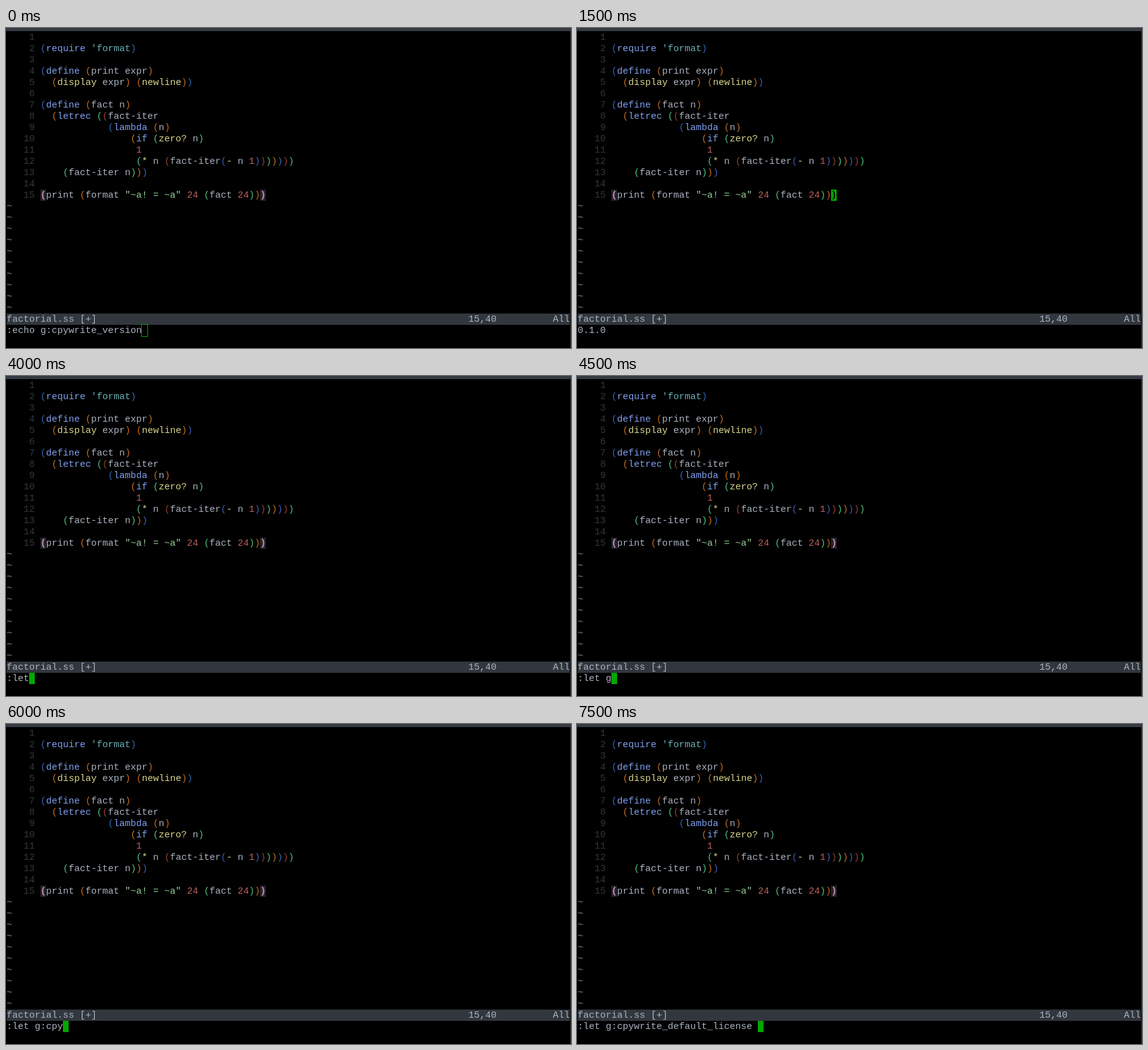
Write an HTML page that moves like this. It is 903 px wide and 511 px high and loops after 8 s.

```html
<!DOCTYPE html>
<html lang="en">
<head>
<meta charset="utf-8">
<title>Editor session</title>
<style>
  :root {
    --fg: #aab3c1;
    --bar: #32373e;
    --green: #00a800;
    --loop: 8s step-end infinite;
  }
  html, body {
    margin: 0;
    width: 100%;
    height: 100%;
    overflow: hidden;
    background: #000;
  }
  /* Rows are 18px high; the taller line box sets the baseline 14px down. */
  #stage {
    position: relative;
    width: 903px;
    height: 511px;
    overflow: hidden;
    color: var(--fg);
    font: 15px/20px "Liberation Mono", monospace;
    white-space: pre;
  }
  #stage > div { position: absolute; }

  #title { left: 0; top: 0; width: 903px; height: 5px; background: #353a43; }
  #edge { left: 902px; top: 0; width: 1px; height: 511px; background: #353a43; }
  #code { left: 1px; top: 6px; }
  #code div, #menu div { height: 18px; }
  #status { left: 1px; top: 456px; width: 900px; height: 18px; background: var(--bar); }
  #status span { position: absolute; top: 0; }

  .nr { color: #31363d; }
  .tilde { color: #5a5f69; font-weight: bold; }
  .key { color: #829fee; }
  .fun { color: #d9d68c; }
  .num { color: #b9605a; }
  .str { color: #97cc97; }
  .sym { color: #68b0b4; }
  .p0 { color: #3560b4; }
  .p1 { color: #c4691a; }
  .p2 { color: #4cbc7c; }
  .p3 { color: #973f2e; }
  .match {
    display: inline-block;
    height: 18px;
    vertical-align: top;
    color: #d08cb4;
    background: #23262b;
    font-weight: bold;
  }

  .cmd { left: 1px; top: 474px; height: 18px; overflow: hidden; }
  #echo { animation: echo var(--loop); }
  #version { animation: version var(--loop); }
  #let { animation: type var(--loop); }

  #menu {
    left: 37px; top: 420px; width: 252px; height: 54px;
    background: var(--bar);
    animation: menu var(--loop);
  }
  #menu div { padding-left: 9px; }
  #menu .on { background: #86a2ee; color: #15181f; }

  #cursor {
    width: 9px;
    height: 18px;
    font-weight: bold;
    animation: cursor var(--loop);
  }

  @keyframes echo {
    0% { visibility: visible; }
    18.75%, 100% { visibility: hidden; }
  }
  @keyframes version {
    0% { visibility: hidden; }
    18.75% { visibility: visible; }
    43.75%, 100% { visibility: hidden; }
  }
  @keyframes menu {
    0% { visibility: hidden; }
    81.25% { visibility: visible; }
    93.75%, 100% { visibility: hidden; }
  }
  @keyframes type {
    0% { width: 0; }
    43.75% { width: 9px; }
    50% { width: 36px; }
    56.25% { width: 54px; }
    68.75% { width: 72px; }
    75% { width: 90px; }
    81.25%, 100% { width: 280px; }
  }
  @keyframes cursor {
    0% { left: 217px; top: 474px; color: transparent; background: transparent; box-shadow: 0 0 0 1px var(--green); }
    12.5% { left: 217px; top: 474px; color: transparent; background: var(--green); box-shadow: 0 0 0 0 var(--green); }
    18.75% { left: 406px; top: 258px; color: #000; background: var(--green); box-shadow: 0 0 0 0 var(--green); }
    43.75% { left: 10px; top: 474px; color: transparent; background: var(--green); box-shadow: 0 0 0 0 var(--green); }
    50% { left: 37px; }
    56.25% { left: 55px; }
    68.75% { left: 73px; }
    75% { left: 91px; }
    81.25% { left: 280px; }
    93.75%, 100% { left: 289px; top: 474px; color: transparent; background: var(--green); box-shadow: 0 0 0 0 var(--green); }
  }
</style>
</head>
<body>
<div id="stage">
  <div id="title"></div>
  <div id="edge"></div>
  <div id="code"></div>
  <div id="status"><span style="left:0">factorial.ss [+]</span><span style="left:738px">15,40</span><span style="left:873px">All</span></div>
  <div class="cmd" id="echo">:echo g:cpywrite_version</div>
  <div class="cmd" id="version">0.1.0</div>
  <div class="cmd" id="let">:let g:cpywrite_default_license</div>
  <div id="menu"><div class="on">g:cpywrite_default_license</div><div>g:cpywrite_verbatim_mode</div><div>g:cpywrite_version</div></div>
  <div id="cursor">)</div>
</div>
<script>
  const source = `
(require 'format)

(define (print expr)
  (display expr) (newline))

(define (fact n)
  (letrec ((fact-iter
            (lambda (n)
                (if (zero? n)
                 1
                 (* n (fact-iter(- n 1)))))))
    (fact-iter n)))

(print (format "~a! = ~a" 24 (fact 24)))`;

  const keywords = ['require', 'define', 'letrec', 'lambda', 'if'];
  const builtins = ['display', 'newline', 'zero?', '*', '-'];
  const activeLine = 15;
  const emptyRows = 10;
  const code = document.getElementById('code');
  let depth = 0;

  function parenStyle(token, line) {
    const level = token === '(' ? depth++ : --depth;
    return line === activeLine && level === 0 ? 'match' : 'p' + level % 4;
  }

  function styleOf(token, line) {
    if (token === '(' || token === ')') return parenStyle(token, line);
    if (token[0] === '"') return 'str';
    if (token[0] === "'") return 'sym';
    if (/^\d+$/.test(token)) return 'num';
    if (keywords.includes(token)) return 'key';
    if (builtins.includes(token)) return 'fun';
    return '';
  }

  function addRow() {
    const row = document.createElement('div');
    code.append(row);
    return row;
  }

  function addSpan(row, text, style) {
    const span = document.createElement('span');
    span.textContent = text;
    span.className = style;
    row.append(span);
  }

  source.split('\n').forEach((text, i) => {
    const line = i + 1;
    const row = addRow();
    addSpan(row, String(line).padStart(5) + ' ', 'nr');
    for (const token of text.match(/"[^"]*"|[()]|\s+|[^\s()"]+/g) || []) {
      addSpan(row, token, styleOf(token, line));
    }
  });
  for (let i = 0; i < emptyRows; i++) addSpan(addRow(), '~', 'tilde');
</script>
</body>
</html>
```
